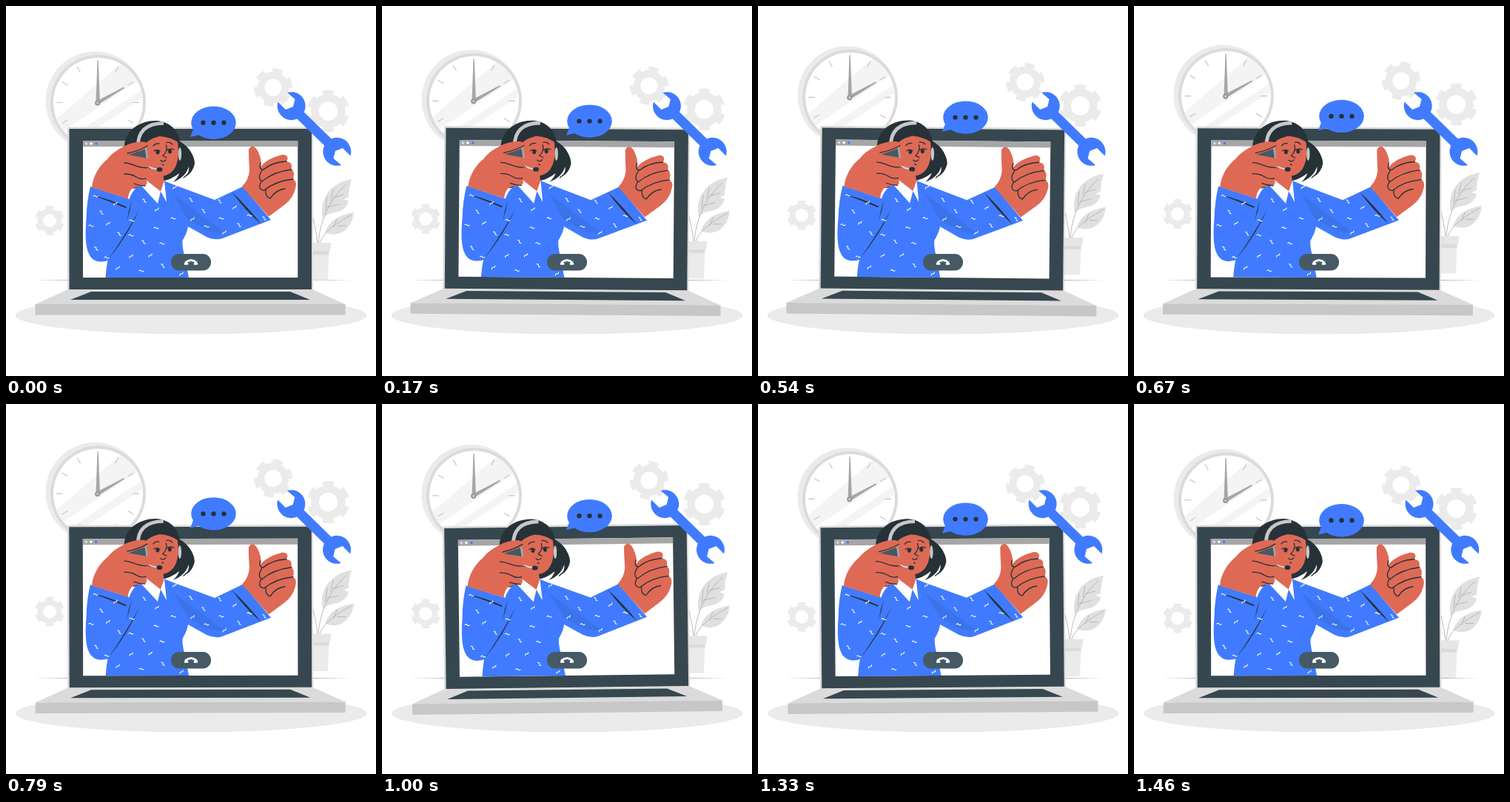
These frames come from a looping animation (500 by 500 pixels, 1500 ms). An HTML page:

```html
<!DOCTYPE html>
<html lang="en">
<head>
<meta charset="utf-8">
<title>Video support</title>
<style>
  html, body { margin: 0; height: 100%; overflow: hidden; background: #fff; }
  svg { display: block; width: 100vw; height: 100vh; }
  .dark { fill: #263238; }
  .blue { fill: #407bff; }
  .skin { fill: #de6a56; }
  .pale { fill: #ebebeb; }
  .white { fill: #fff; }
  .line { fill: none; stroke: #263238; stroke-width: 1.3; stroke-linecap: round; stroke-linejoin: round; }
  .vein { fill: none; stroke: #b3b3b3; stroke-width: .9; stroke-linecap: round; }
</style>
</head>
<body>
<svg viewBox="0 0 500 500">
  <clipPath id="face"><circle cx="124.500" cy="130.500" r="60.500"/></clipPath>
  <path class="dark" d="M38 370.500L250 369.800 468 370.500 250 371.200Z"/>

  <g class="float" id="clock">
    <circle class="pale" cx="120.500" cy="128.500" r="67"/>
    <circle cx="124.500" cy="130.500" r="64.500" fill="#dbdbdb"/>
    <circle class="white" cx="124.500" cy="130.500" r="60.500"/>
    <g clip-path="url(#face)" fill="#f4f4f4">
      <path d="M64 156L156 77 184 97 76 170Z"/>
      <path d="M92 174L190 109V121L106 176Z"/>
    </g>
    <path id="ticks" fill="none" stroke="#c7c7c7" stroke-width="1.200"/>
    <path d="M123.500 73.500h1.200L127 131l-2.500 3.500-3-3.500Z" fill="#a6a6a6"/>
    <path d="M121.500 129L159 109.500l1 1.500-35 22Z" fill="#a6a6a6"/>
    <circle cx="123.700" cy="131" r="3.600" fill="#999"/>
    <circle cx="123.700" cy="131" r="1.300" fill="#dbdbdb"/>
  </g>

  <g class="float" id="gears" fill="none" stroke="#ebebeb"></g>

  <g class="float">
    <path class="vein" d="M421 320Q419 300 412 276"/>
    <path d="M428 287C423 262 437 239 467 234Q463 247 463 258L456 261 463 263Q460 276 445 279Q434 280 428 287Z" fill="#e0e0e0"/>
    <path d="M431 306C436 291 449 282 470 279C468 300 451 315 431 306Z" fill="#e0e0e0"/>
    <path class="vein" d="M422 320C424 295 434 264 460 241M424 320C430 304 446 294 467 282M432 276L434 258M439 263L442 248M434 272L450 268M442 259L456 255M443 299L447 288M448 297L459 297"/>
    <path class="pale" d="M410 331H436.500L435 370.500H410Z"/>
    <path d="M410 331H436.500V336H410Z" fill="#dbdbdb"/>
    <path d="M408 320H439.500L438 331H408Z" fill="#e6e6e6"/>
  </g>

  <ellipse class="pale" cx="250" cy="418" rx="237.300" ry="25.600"/>

  <g id="laptop">
    <rect x="83" y="163.500" width="332" height="222" rx="2" fill="#dbdbdb"/>
    <path d="M85.500 166H413V383H85.500Z" fill="#37474f"/>
    <path class="white" d="M104 182H394.300V367H104Z"/>
    <path d="M104 182H394.300V190H104Z" fill="#a6a6a6"/>
    <circle cx="108.500" cy="186" r="1.800" fill="#dbdbdb"/>
    <circle class="white" cx="115" cy="186" r="1.800"/>
    <circle class="blue" cx="122" cy="186" r="1.800"/>
    <path d="M83 383.500H415L458.500 403H39.500Z" fill="#dbdbdb"/>
    <path d="M39.500 403H458.500V417.500H39.500Z" fill="#c7c7c7"/>
    <path d="M115 386H384L411 397H87Z" fill="#37474f"/>

    <!-- Hair and torso -->
    <path class="dark" d="M160 188C162 168 180 155 203 155C221 156 233 168 235 183C245 189 255 201 255 213Q253 224 244 230Q248 222 247 217Q243 231 226 238Q233 231 234 226Q222 236 208 237L172 247Q166 215 160 188Z"/>
    <path class="line" d="M235 184Q252 194 252 209T240 232" stroke-width=".8"/>
    <path class="blue" d="M188 238L213 236 228 242 282 262 320 244 358 289 291 314.500Q282 317 271 312L246 298Q245 306 238.500 317Q238 325 241 337L247 367H134.500Q136 342 144 318L166 264Q169 247 188 238Z"/>
    <path d="M225 254L297 307Q283 307 271 303L246 289Z" fill="#3b73ea"/>
    <path class="skin" d="M190 218L212 226 214 238 209 251Q196 245 189 236Z"/>
    <path class="white" d="M183 243L189 235 209 250.500 205 267ZM209 250.500L214 236 217 265Z"/>

    <!-- Face -->
    <path class="skin" d="M187 188C191 181 200 178 208 176Q222 177 232 184C234 199 233 213 226 222C218 231 207 232 200 226C191 217 188 203 187 188Z"/>
    <path class="line" d="M199 189Q202 185 207 186M217 184.500Q221 183 225 187" stroke-width="1.800"/>
    <path class="line" d="M200 196Q204 193 208 196M217 195Q222 192 227 194M216.500 188Q219 196 212 202.500L217 205M209 208.500Q212 212 216 208M211 214L213 215"/>
    <ellipse class="dark" cx="205" cy="197.500" rx="2.500" ry="2.900"/>
    <ellipse class="dark" cx="221.500" cy="196.500" rx="2.500" ry="2.900"/>

    <!-- Headset -->
    <path d="M178.500 190C178 170 189 158.500 213 158.300" fill="none" stroke="#c7c7c7" stroke-width="4.800"/>
    <ellipse cx="235" cy="200" rx="2.200" ry="9" fill="#c7c7c7"/>
    <path d="M188 214Q196 220 205 220.500" fill="none" stroke="#dbdbdb" stroke-width="1.800"/>
    <ellipse class="dark" cx="207.500" cy="221" rx="4" ry="3"/>
    <path d="M163 201L184 190 190 194V209L180 207Z" fill="#455a64"/>
    <path d="M188 190Q192 202 190 216" fill="none" stroke="#a6a6a6" stroke-width="2.600"/>

    <!-- Raised arm -->
    <path class="blue" d="M114 244L170 262 166 278 179 276Q173 302 152 333Q142 346 127 345.500C108 344 106 320 108.500 288Q109 264 114 244Z"/>
    <path class="skin" d="M116 245C118 228 127 215 137 207C143 199 152 193 165 187C174 184 185 182 190 185Q194 190 186 194L166 201C177 204 190 204 195 208Q200 215 189 219Q198 223 196 230Q194 234 188 233Q193 239 188 243Q178 243 170 247Q165 253 165 260.500Z"/>
    <path class="line" d="M191 189Q179 196 164 199M160 212C171 212 176 219 190 218.500M160 227Q170 227 176 231T189 233M188 243Q180 243 173 240"/>
    <path class="dark" d="M115 255Q140 261 163 271.500L162 273Q140 264 115 255ZM170 263Q168 277 163 291Q166 276 170 263ZM180 275Q165 310 137 344Q161 311 180 275Z"/>

    <!-- Thumb up -->
    <path class="skin" d="M319 244Q328 235 329 222Q328 207 328 194C331 187 338 188 342 200Q346 209 344 217Q353 206 373 201C381 200 382 206 379 210Q388 211 385.500 220.500Q391 224 388 234Q394 237 391 247Q388 260 376 269L355 284.500Z"/>
    <path class="line" d="M344 212Q341 221 348 221Q360 211 379 210M346 222Q339 233 346 237Q361 224 386 221M345 237Q339 248 349 249Q365 236 388 234M351 248Q350 258 357 260Q365 248 377 247"/>
    <path class="dark" d="M305 251Q327 272 345 295Q323 276 305 251Z"/>

    <g id="pattern" class="line" style="stroke: #fff; stroke-width: 1.100"></g>
  </g>

  <!-- Hang-up button -->
  <rect x="223" y="335" width="54" height="22.500" rx="11" fill="#455a64"/>
  <path d="M242.300 346.800Q250 340.300 257.700 346.800" fill="none" stroke="#fff" stroke-width="2.800"/>
  <path class="white" d="M241 346.800H246.200V349.800H241ZM253.800 346.800H259V349.800H253.800Z"/>

  <g id="wrench" class="blue">
    <path d="M393 143L440 189" stroke="#407bff" stroke-width="13"/>
    <path id="jaw" d="M380 117A19 19 0 1 1 367.500 129.500L378 140 388 136 390.500 126Z"/>
    <use href="#jaw" transform="rotate(180 416.500 166)"/>
  </g>

  <g class="float">
    <path class="blue" d="M254 164L249 177 266 173Z"/>
    <ellipse class="blue" cx="280.500" cy="157.800" rx="30.300" ry="22.200"/>
    <g class="dark">
      <circle cx="266.500" cy="157.800" r="3.200"/>
      <circle cx="280.500" cy="157.800" r="3.200"/>
      <circle cx="294.500" cy="157.800" r="3.200"/>
    </g>
  </g>
</svg>
<script>
const LOOP = 1500, FRAMES = 36;
const $ = id => document.getElementById(id);

// Clock ticks, every hour except the one under the minute hand
let ticks = '';
for (let hour = 1; hour < 12; hour++) {
  const a = hour * Math.PI / 6, x = Math.sin(a), y = -Math.cos(a);
  ticks += `M${124 + 47 * x} ${130.5 + 47 * y}l${9 * x} ${9 * y}`;
}
$('ticks').setAttribute('d', ticks);

// A ring with six broad teeth; at turn 0 one tooth points straight up
const gear = (x, y, r, turn) => `<g transform="translate(${x} ${y}) rotate(${turn - 106.5})">
  <circle r="${r * .63}" stroke-width="${r * .37}"/>
  <circle r="${r * .88}" stroke-width="${r * .24}" pathLength="12" stroke-dasharray="1.1 .9"/></g>`;
$('gears').innerHTML = gear(361, 110, 26, 15) + gear(435.5, 142, 28.5, 0) + gear(59, 290, 20, 0);

// Squiggles on the sweater
const spots = [
  [121, 257], [148, 267], [129, 279], [115, 297], [138, 294], [122, 328], [136, 340], [151, 354],
  [153, 308], [169, 310], [169, 338], [186, 319], [203, 300], [204, 275], [187, 263], [183, 358],
  [195, 337], [212, 351], [211, 321], [228, 245], [250, 262], [226, 287], [237, 362], [267, 277],
  [271, 298], [252, 288], [289, 264], [291, 287], [295, 306], [315, 296], [329, 283], [309, 272],
  [349, 287], [170, 290]
];
$('pattern').innerHTML = spots.map(([x, y], i) =>
  `<path d="M-3 .3q1.500-1.800 3-.3t3-.3" transform="translate(${x} ${y}) rotate(${[10, -40, 50][i % 3]})"/>`).join('');

// Standard CSS "ease" curve
function ease(x) {
  let lo = 0, hi = 1, s = .5;
  for (let i = 0; i < 20; i++) {
    s = (lo + hi) / 2;
    if (.75 * s - .75 * s * s + s ** 3 < x) lo = s; else hi = s;
  }
  return .3 * s * (1 - s) ** 2 + 3 * s * s * (1 - s) + s ** 3;
}

const shakeStops = [0, -1, 2, -4, 4, -4, 4, -4, 2, -1, 0];
function shake(p) {
  const i = Math.floor(p * 10);
  return shakeStops[i] + (shakeStops[i + 1] - shakeStops[i]) * ease(p * 10 - i);
}

// Triangle wave: 0, 1, 0, -1, 0
const sway = p => p < .25 ? 4 * p : p < .75 ? 2 - 4 * p : 4 * p - 4;

const floats = document.querySelectorAll('.float');
function draw(now) {
  const frame = Math.floor(now % LOOP / LOOP * FRAMES + .1) % FRAMES;
  const p = frame / FRAMES;
  const lift = -10 * (1 - Math.abs(1 - 2 * p));
  floats.forEach(el => el.setAttribute('transform', `translate(0 ${lift})`));
  $('laptop').setAttribute('transform', `rotate(${sway(p)} 249 286)`);
  $('wrench').setAttribute('transform', `translate(${shake(p)} 0)`);
}

let start;
function tick(now) {
  start ??= now;
  draw(now - start);
  requestAnimationFrame(tick);
}
draw(0);
requestAnimationFrame(tick);
</script>
</body>
</html>
```
